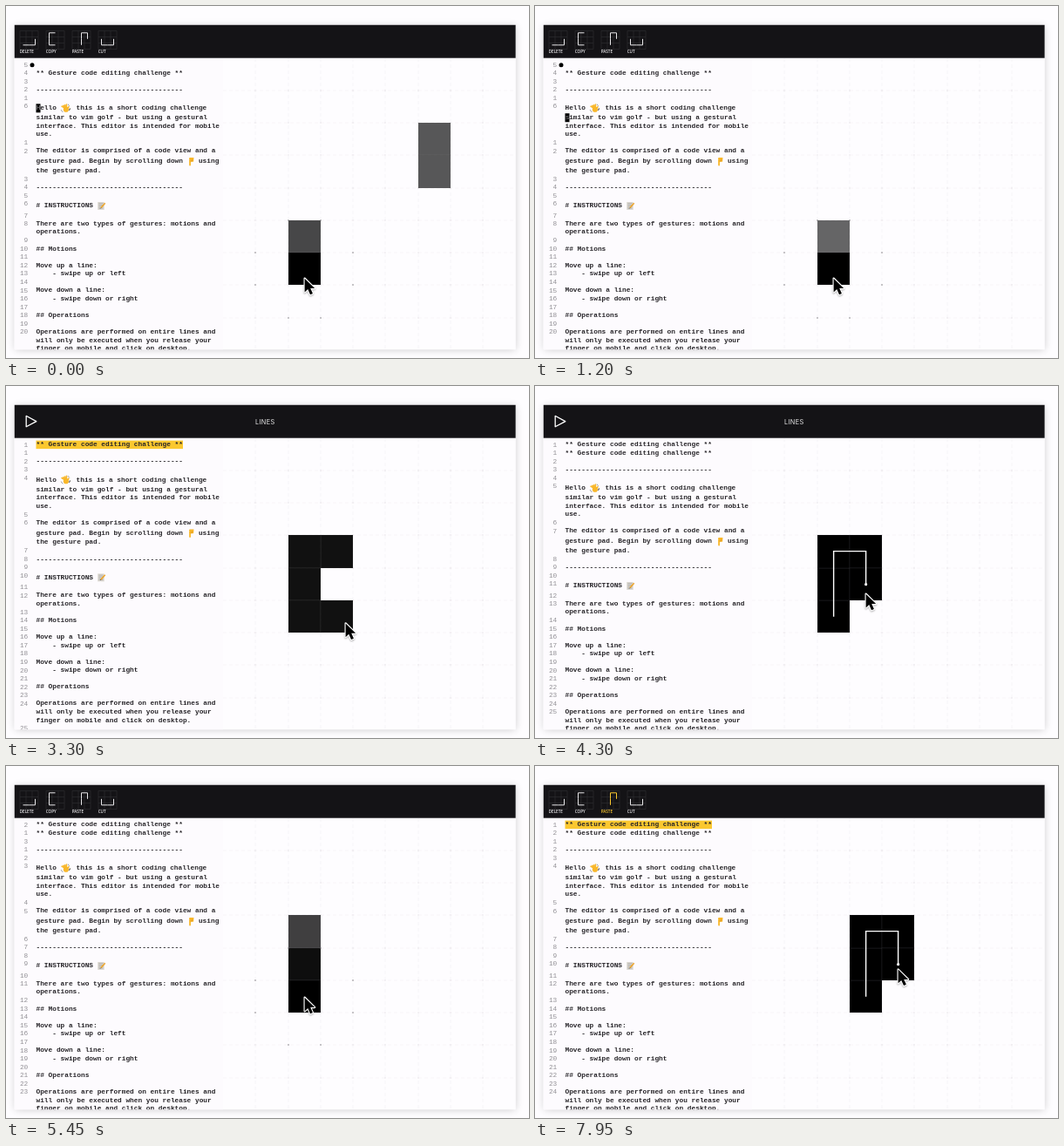
Recreate the animation shown at these times as an HTML page with a canvas. Size 600 by 404 pixels, loop 8 s.

```html
<!DOCTYPE html>
<html lang="en">
<head>
<meta charset="utf-8">
<title>Gesture code editor</title>
<style>
html, body { margin: 0; width: 100%; height: 100%; overflow: hidden; background: #fefdff; }
canvas { display: block; width: 600px; height: 404px; }
</style>
</head>
<body>
<canvas id="stage"></canvas>
<script>
const LOOP = 8000, FADE = 350, CELL = 37.25, CHAR = 4.68, ROW = 9.55, TALL = 13.1;
const MONO = '7.8px "Liberation Mono", "Courier New", monospace';
const YELLOW = '#fbc82f';
const canvas = document.getElementById('stage');
const g = canvas.getContext('2d');
const ratio = window.devicePixelRatio || 1;
canvas.width = 600 * ratio;
canvas.height = 404 * ratio;

const title = '** Gesture code editing challenge **';
const rule = '-'.repeat(36);
// Each entry is one logical line; | marks a soft wrap, {w} {p} {m} are little pictures.
const page = ['●', title, '', rule, '',
  'Hello {w}, this is a short coding challenge|similar to vim golf - but using a gestural|interface. This editor is intended for mobile|use.',
  '', 'The editor is comprised of a code view and a|gesture pad. Begin by scrolling down {p} using|the gesture pad.',
  '', rule, '', '# INSTRUCTIONS {m}', '',
  'There are two types of gestures: motions and|operations.',
  '', '## Motions', '', 'Move up a line:', '    - swipe up or left',
  '', 'Move down a line:', '    - swipe down or right', '', '## Operations', '',
  'Operations are performed on entire lines and|will only be executed when you release your|finger on mobile and click on desktop.', ''];

const px = c => Math.round(249.2 + c * CELL), py = r => Math.round(59.6 + r * CELL);
const center = ({ c, r }) => [px(c) + CELL / 2, py(r) + CELL / 2];

// Follows a path of U D L R from a cell; a dot is a pause.
const step = { U: [0, -1], D: [0, 1], L: [-1, 0], R: [1, 0], '.': [0, 0] };
function walk(c, r, path) {
  return ['.', ...path].map((key, i) => ({ key, i, c: c += step[key][0], r: r += step[key][1] }));
}
const icons = { DELETE: walk(0, 2, 'RRU'), COPY: walk(1, 0, 'LDDR'), PASTE: walk(1, 2, 'UURD'), CUT: walk(0, 1, 'DRRU') };

// An operation is recognised at fix, takes effect at show, is released at end, leaves the header at hide.
function stroke(start, pace, c, r, path, op, end, hide) {
  const hand = walk(c, r, path).map(k => ({ ...k, t: start + k.i * pace }));
  const last = hand[hand.length - 1].t;
  const cells = hand.filter(k => !k.i || k.key !== '.');
  return { start, pace, hand, cells, op, hide, end: op ? end : last + 300,
    fix: op ? last + 20 : Infinity, show: last + 120 };
}
const strokes = [
  stroke(-600, 100, 6, 2, 'D', 'CUT', 0, 0),
  stroke(-205, 20, 2, 5, 'D'),
  stroke(300, 150, 2, 6, 'U'),
  stroke(650, 165, 2, 4, 'DD'),
  stroke(1285, 35, 2, 6, 'UUUULL'),
  stroke(1500, 55, 2, 4, 'RRU', 'DELETE', 1800, 2550),
  stroke(2505, 55, 4, 5, 'LL'),
  stroke(2850, 60, 3, 3, 'LDDR', 'COPY', 3210, 3600),
  stroke(3450, 90, 2, 5, 'UURD', 'PASTE', 4350, 4350),
  stroke(4600, 80, 4, 5, 'RR'),
  stroke(4895, 95, 3, 3, 'L..DD.R', 'COPY', 5660, 6250),
  stroke(6640, 120, 3, 5, 'U'),
  stroke(7520, 85, 3, 5, 'UURD', 'PASTE', LOOP, LOOP)
];
strokes.forEach((s, i) => s.end = Math.min(s.end, i + 1 < strokes.length ? strokes[i + 1].start : Infinity));
const ops = strokes.filter(s => s.op);
const moves = strokes.filter(s => !s.op).flatMap(s => s.cells.slice(1));

// The pointer visits cell centres, overshoots a little, and sinks after an operation.
const track = [];
for (const { start, pace, hand, op, end } of strokes) {
  const arrive = start + pace / 2, [fx, fy] = center(hand[0]);
  while (track.length && track[track.length - 1].t >= arrive) track.pop();
  const from = track[track.length - 1];
  if (from) track.push({ ...from, t: Math.max(from.t, arrive - Math.hypot(fx - from.x, fy - from.y)) });
  for (const k of hand) {
    const [x, y] = center(k);
    track.push({ t: k.t + pace / 2, x, y });
  }
  const { t, x, y } = track[track.length - 1], [dx, dy] = step[hand[hand.length - 1].key];
  const rest = { t: t + 100, x: x + dx * 10, y: y + dy * 10 };
  track.push(rest);
  if (op) track.push({ ...rest, t: Math.max(rest.t, end) }, { ...rest, t: end + 250, y: rest.y + 20 });
}

function trace(points, close) {
  g.beginPath();
  points.forEach(([x, y]) => g.lineTo(x, y));
  if (close) g.closePath();
}
function line(points, color, width, close) {
  trace(points, close);
  g.strokeStyle = color;
  g.lineWidth = width;
  g.stroke();
}
function box(x, y, w, h, color) {
  g.fillStyle = color;
  g.fillRect(x, y, w, h);
}
function disc(x, y, r, color) {
  g.fillStyle = color;
  g.beginPath();
  g.arc(x, y, r, 0, 7);
  g.fill();
}
function label(text, x, y, font, color, align = 'left') {
  g.font = font;
  g.fillStyle = color;
  g.textAlign = align;
  g.fillText(text, x, y);
}

const pictures = {
  w(x, y) {
    const skin = '#f8b72b';
    g.lineCap = 'round';
    for (let i = 0; i < 4; i++) line([[x + 6.5, y + 1], [x + 1.5 + i * 1.8, y - 2.2 - i * .7]], skin, 1.7);
    line([[x + 7, y + 2], [x + 9.3, y - 1.5]], skin, 1.7);
    disc(x + 6.3, y + 1.4, 3.1, skin);
    line([[x + .6, y + 2], [x + 2.4, y + 4.3]], '#777', .7);
    line([[x + 8.5, y - 4.4], [x + 10, y - 2.8]], '#777', .7);
    g.lineCap = 'butt';
  },
  p(x, y) {
    g.lineCap = 'round';
    line([[x + 3.4, y - 1], [x + 3.4, y + 4.4]], '#f8b72b', 1.8);
    line([[x + 3.6, y - 2.8], [x + 6.4, y - 2.8], [x + 6.2, y - .6], [x + 4, y - .6]], '#f8b72b', 2.6);
    g.lineCap = 'butt';
    line([[x + 5, y + .8], [x + 5, y - 1.2], [x + 7.4, y - 1.2]], '#d68d1c', .5);
  },
  m(x, y) {
    box(x + .5, y - 4.5, 7.5, 9, '#ddd9d2');
    for (let i = 0; i < 4; i++) line([[x + 1.6, y - 2.8 + i * 1.8], [x + 6.8, y - 2.8 + i * 1.8]], '#999', .6);
    line([[x + 9, y - 3.2], [x + 4.2, y + 2.2]], '#eda52c', 1.6);
    line([[x + 4.2, y + 2.2], [x + 3.4, y + 3.1]], '#555', 1);
  }
};

function drawRow(text, y) {
  let x = 34.5;
  for (const part of text.split(/(\{.\})/)) {
    if (part[0] === '{') {
      pictures[part[1]](x, y);
      x += 8.6;
    } else {
      label(part, x, y, 'bold ' + MONO, '#262428');
      x += part.length * CHAR;
    }
  }
}

function drawText(t, op) {
  const lines = [...page];
  for (const s of ops) {
    if (t < s.show) continue;
    if (s.op === 'DELETE') lines.shift();
    if (s.op === 'PASTE') lines.unshift(title);
  }
  const rows = lines.flatMap((text, i) => text.split('|').map((row, k) => ({ row, n: i + 1, first: !k })));
  const caret = moves.filter(k => k.t <= t)
    .reduce((at, { key }) => Math.max(0, at + (step[key][0] + step[key][1])), 4);
  const at = rows[caret].n;
  let top = 62.6;
  if (op && lines[0] === title && (op.op === 'COPY' || t < op.show)) box(34.5, top, title.length * CHAR, ROW, YELLOW);
  rows.forEach(({ row, n, first }, i) => {
    const tall = row.includes('{'), h = tall ? TALL : ROW, y = top + h / 2 + (tall ? .4 : 0);
    if (first) label(n === at ? n : Math.abs(n - at), 25.3, top + 4.9, MONO, '#929095', 'right');
    if (row === '●') disc(30, y + .3, 2.5, '#000');
    else drawRow(row, y);
    if (i === caret && row && !op) {
      box(34.5, y - 5, 5, 10, '#000');
      if (row !== '●') label(row[0], 34.7, y, MONO, '#8b898d');
    }
    top += h;
  });
}

function drawHeader(t, op) {
  box(9.5, 21.5, 575.3, 38.2, '#141316');
  if (op && t >= op.show) {
    g.lineJoin = 'round';
    line([[23.2, 34.3], [34.8, 40.6], [23.2, 46.8]], '#fff', 1.3, true);
    g.letterSpacing = '0.4px';
    label('LINES', 297.3, 41.8, '7.3px Inter, "Open Sans", sans-serif', '#eee', 'center');
    g.letterSpacing = '0px';
    return;
  }
  Object.entries(icons).forEach(([name, path], i) => {
    const x = 16 + i * 30, color = op && op.op === name ? YELLOW : '#e9e8ea';
    for (let k = 0; k < 4; k++) {
      line([[x + k * 7, 28.5], [x + k * 7, 49.5]], '#302f33', .6);
      line([[x, 28.5 + k * 7], [x + 21, 28.5 + k * 7]], '#302f33', .6);
    }
    line(path.map(({ c, r }) => [x + 3.5 + c * 7, 30.8 + r * 7]), color, 1);
    label(name, x - .3, 52.9, '600 4.6px "Open Sans", sans-serif', color);
  });
}

function drawStroke(s, t) {
  const fixed = t >= s.fix, seen = s.cells.filter(k => k.t <= t);
  seen.forEach(({ c, r }, i) => {
    const left = fixed || i + 1 === seen.length ? s.end : Math.min(seen[i + 1].t, s.end);
    const age = Math.max(0, t - left) / FADE;
    if (age >= 1) return;
    const x = px(c), y = py(r), w = px(c + 1) - x, h = py(r + 1) - y;
    g.globalAlpha = 1 - age * age;
    box(x, y, w, h, '#000');
    g.globalAlpha *= .15;
    g.strokeStyle = '#aaa8ac';
    g.lineWidth = .7;
    g.strokeRect(x, y, w, h);
    g.globalAlpha = 1;
  });
  if (!seen.length || t >= s.end) return;
  if (fixed) {
    const mid = s.cells.map(center);
    line(mid, '#fff', 1.4);
    disc(...mid[mid.length - 1], 1.6, '#fff');
    return;
  }
  const { c, r } = seen[seen.length - 1];
  for (const a of [0, 1])
    for (const b of [-1, 2])
      for (const [x, y] of [[c + a, r + b], [c + b, r + a]])
        box(px(x) - .6, py(y) - .6, 1.2, 1.2, '#79777b');
}

function drawPad(t) {
  g.setLineDash([4, 3]);
  for (let i = 1; i < 9; i++) {
    line([[px(i), 60], [px(i), 394]], '#f5f3f7', .8);
    line([[px(0), py(i)], [584, py(i)]], '#f5f3f7', .8);
  }
  g.setLineDash([]);
  for (let c = 1; c < 9; c++)
    for (let r = 1; r < 9; r++) box(px(c) - .5, py(r) - .5, 1, 1, '#d9d7db');
  strokes.forEach(s => drawStroke(s, t));
}

function drawMouse(t) {
  const i = track.findIndex(k => k.t > t), a = track[i - 1], b = track[i];
  const f = (t - a.t) / (b.t - a.t);
  g.save();
  g.translate(a.x + (b.x - a.x) * f, a.y + (b.y - a.y) * f + 1);
  g.scale(.93, .93);
  trace([[0, 0], [0, 17], [3.9, 13.4], [6.9, 20], [10, 18.6], [7.1, 12.3], [12.4, 12.3]], true);
  g.shadowColor = 'rgba(0,0,0,.3)';
  g.shadowBlur = 2 * ratio;
  g.shadowOffsetY = ratio;
  g.lineJoin = 'round';
  g.lineWidth = 2.4;
  g.strokeStyle = '#fff';
  g.stroke();
  g.shadowColor = 'transparent';
  g.fillStyle = '#000';
  g.fill();
  g.restore();
}

function draw(t) {
  const op = ops.filter(s => t >= s.fix).pop();
  const active = op && t < op.hide && op.hide > 0 ? op : null;
  g.setTransform(ratio, 0, 0, ratio, 0, 0);
  g.textBaseline = 'middle';
  box(0, 0, 600, 404, '#fefdff');
  g.save();
  g.shadowColor = 'rgba(0,0,0,.2)';
  g.shadowBlur = 9 * ratio;
  g.shadowOffsetY = ratio;
  box(9.5, 21.5, 575.3, 372.8, '#fefdff');
  g.restore();
  g.save();
  g.beginPath();
  g.rect(9.5, 21.5, 575.3, 372.8);
  g.clip();
  box(9.5, 59, 239.5, 336, '#fdfbfe');
  drawText(t, active);
  drawPad(t);
  drawHeader(t, active);
  g.restore();
  drawMouse(t);
}

const begin = performance.now();
function frame() {
  draw((performance.now() - begin) % LOOP);
  requestAnimationFrame(frame);
}
frame();
</script>
</body>
</html>
```
